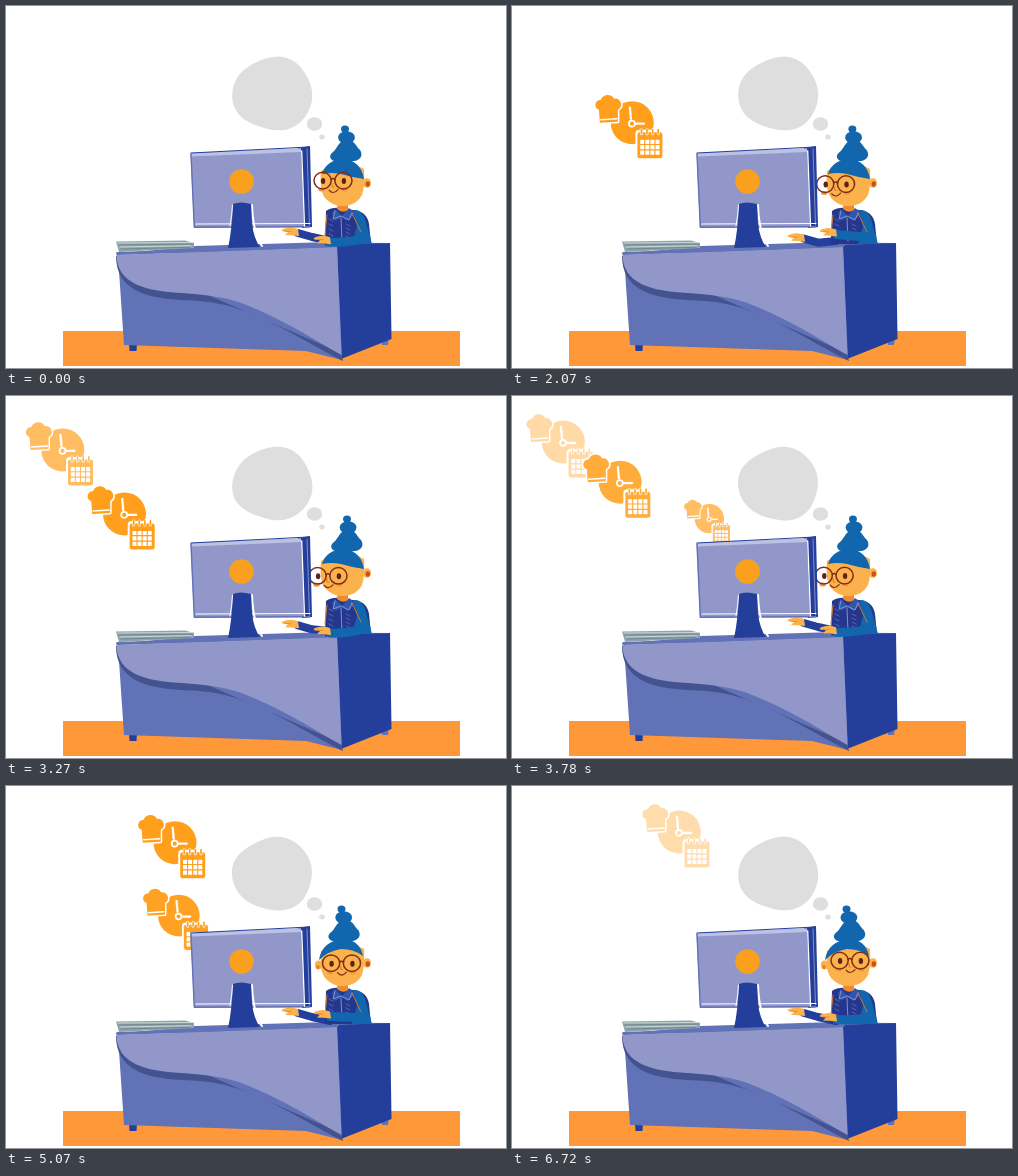
Animation of 500 by 362 pixels, one loop 6.75 s. Source, as an HTML page with a canvas:

```html
<!DOCTYPE html>
<html lang="en">
<head>
<meta charset="utf-8">
<title>Planning at the desk</title>
<style>
html, body { margin: 0; width: 100%; height: 100%; overflow: hidden; background: #fff; }
canvas { display: block; width: 500px; height: 362px; }
</style>
</head>
<body>
<canvas id="stage" width="500" height="362"></canvas>
<script>
const g = document.getElementById('stage').getContext('2d');
const LOOP = 6750, STEP = 30, TAU = Math.PI * 2;
const NAVY = '#233f9b', MID = '#6172b6', PALE = '#9297c9', BLUE = '#1166ad',
  SKIN = '#fcb24c', BROWN = '#7d2d18', ORANGE = '#ff9838', VEST = '#24378c';

g.lineCap = g.lineJoin = 'round';

function shape(d, color) {
  g.fillStyle = color;
  g.fill(new Path2D(d));
}
function line(d, color, width) {
  g.strokeStyle = color;
  g.lineWidth = width;
  g.stroke(new Path2D(d));
}
function oval(x, y, rx, ry, color, stroke) {
  g.beginPath();
  g.ellipse(x, y, rx, ry, 0, 0, TAU);
  if (stroke) {
    g.strokeStyle = color;
    g.lineWidth = stroke;
    g.stroke();
  } else {
    g.fillStyle = color;
    g.fill();
  }
}
function box(x, y, w, h, r, color) {
  g.beginPath();
  g.roundRect(x, y, w, h, r);
  g.fillStyle = color;
  g.fill();
}
const clamp = (v, lo = 0, hi = 1) => Math.max(lo, Math.min(hi, v));
const smooth = u => u * u * (3 - 2 * u);

// Each icon leaves the screen on a quadratic curve, grows, then fades
const SOURCE = [235, 175], FIRST = 1090, EVERY = 1020, FLIGHT = 2700, GROW = 950;
const flights = [
  { bend: [107, 139], end: [48, 50], life: 3350 },
  { bend: [86, 160], end: [107, 57], life: 2950 },
  { bend: [170, 105], end: [164, 50], life: 4400 },
  { bend: [163, 119], end: [122, 123], life: 2500 }
];

function icon({ bend, end, life }, age) {
  if (age <= 0 || age >= life) return;
  const e = Math.sin(clamp(age / FLIGHT) * TAU / 4);
  const [x, y] = SOURCE.map((s, i) =>
    (1 - e) ** 2 * s + 2 * e * (1 - e) * bend[i] + e * e * end[i]);
  const size = clamp(age / GROW);
  const fade = Math.min(size, clamp(2 - 2 * age / life));
  const color = `rgb(${[255, 159, 28].map(c => Math.round(255 + (c - 255) * fade))})`;
  const hat = 'M-29-4L-30-17C-35-18-35-27-28-27C-26-33-17-33-15-28C-8-29-5-20-11-17L-11-5Z';
  g.save();
  g.translate(x, y);
  g.scale(size, size);
  oval(3.3, -4, 21.5, 21.5, color);
  line('M1-19L2-8M7-3H15', '#fff', 2.3);
  oval(3, -3, 3, 3, '#fff', 1.8);
  line(hat, '#fff', 3);
  shape(hat, color);
  line('M-28-7L-12-8', '#fff', 1.5);
  box(6.5, 3, 28.5, 30, 4, '#fff');
  box(8.5, 5.5, 25, 26, 2.5, color);
  for (let i = 0; i < 4; i++) {
    const ring = `M${12.5 + i * 5.6} 3V7`;
    line(ring, '#fff', 3);
    line(ring, color, 1.7);
  }
  for (let i = 0; i < 12; i++)
    box(11.3 + i % 4 * 5.1, 13 + Math.floor(i / 4) * 5.4, 4, 4.2, .3, '#fff');
  g.restore();
}

function bubble(t) {
  const rock = .12 * Math.sin(TAU * 5 * t / LOOP);
  g.beginPath();
  for (let i = 0; i < 60; i++) {
    const a = i / 60 * TAU;
    const r = 1 + .035 * Math.cos(3 * (a - .9 + rock)) + .012 * Math.cos(5 * a - rock * 8);
    g.lineTo(267 + 40 * r * Math.cos(a), 88 + 36.5 * r * Math.sin(a));
  }
  g.fillStyle = '#dedede';
  g.fill();
  oval(308.5, 118, 7.7, 6.8, '#dedede');
  oval(316, 131, 2.8, 2.5, '#dedede');
}

function head(t) {
  const sway = Math.cos(TAU * t / LOOP);
  const turn = smooth(clamp((t - 3900) / 800));
  const fx = 324.5 + 2.5 * sway + 11 * turn, fy = 177.2 - 2.6 * sway;
  const lean = 1 - sway - 4.5 * turn;
  const front = turn > .6;

  shape('M332 192H342V204Q337 208 331 203Z', '#f08a2c');
  oval(361, 177, 4, 4.8, SKIN);
  oval(361.8, 178, 2.2, 2.8, '#c8521d');
  if (front) {
    oval(312.5, 179, 3.6, 4.5, SKIN);
    oval(312, 181, 1.5, 2, '#e8772a');
  }
  shape('M315 165Q313 186 320 193Q328 201 338 200Q351 199 356 189Q359 180 358 163Q337 151 315 165Z', SKIN);

  oval(339 + lean, 123, 4, 3.6, BLUE);
  oval(340.5 + lean * .8, 131.5, 8.4, 6.2, BLUE);
  g.save();
  g.translate(lean * .5, 0);
  shape('M340 134C349 133 350 141 354 144C359 152 350 156 345 155L347 159H331L334 155C325 157 321 150 327 146C332 142 332 135 340 134Z', BLUE);
  g.restore();
  shape(front
    ? 'M313 174Q316 155 337 153Q354 154 357 170Q348 163 335 163Q322 165 313 174Z'
    : 'M316 168Q320 154 338 153Q355 155 358 173Q345 171 335 168Q325 166 316 168Z', BLUE);

  for (const side of [-1, 1]) {
    const x = fx + side * 10.4;
    oval(x + side, fy + 9, 3.2, 2, '#f59a3a');
    oval(x + .5, fy + .5, 2.2, 3, '#5c2416');
    oval(x, fy, 8.6, 8.3, BROWN, 1.5);
  }
  line(`M${fx - 2} ${fy - 1}Q${fx} ${fy - 3} ${fx + 2} ${fy - 1}`, BROWN, 1.4);
  line(`M${fx - .8} ${fy + 3}Q${fx - 2} ${fy + 6.5} ${fx + 1} ${fy + 6.5}`, '#e8812d', 1.3);
  line(`M${fx - 4} ${fy + 9.5}Q${fx} ${fy + 14.5} ${fx + 5} ${fy + 9}`, BROWN, 1.2);
}

function hand(x, y) {
  shape(`M${x + 10} ${y - 3}Q${x + 3} ${y - 6} ${x - 5} ${y - 3}Q${x - 8} ${y - 1} ${x - 4} ${y - .5}`
    + `L${x} ${y}L${x - 3} ${y + 3}Q${x + 3} ${y + 3} ${x + 11} ${y + 4}Z`, SKIN);
  line(`M${x - 3} ${y - .8}L${x + 3} ${y - .5}`, '#e8812d', .8);
}

function woman(t) {
  const beat = t / 270;
  const swing = clamp(1.6 * Math.cos(TAU * (beat + .08)), -1, 1);
  const ly = 231.5 - 5.5 * swing, ry = 230.5 + 4.5 * Math.cos(TAU * (beat - .1));
  line(`M292 ${ly + 1}L306 ${ly + 5}L324 235`, NAVY, 8);
  hand(282, ly);
  shape('M320 205Q326 201 334 202L347 204Q361 205 363 218L365 238H319Z', VEST);
  shape('M347 204Q356 203 359 213L366 238H346L351 220Z', BLUE);
  shape('M329 203L336 210L343 202L350 208L341 215L336 211L329 215L326 207Z', '#2f55ad');
  line('M329 205L327 213L335 210L343 214L346 207M335 212L336 235', '#9aa6d6', .8);
  line('M346 207L355 226M321 209L319 228', '#c9773a', 1);
  for (let i = 0; i < 4; i++)
    line(`M323 ${213 + i * 5}l4 2M340 ${218 + i * 4}l4 2`, '#6a79bd', .7);
  line(`M360 232Q342 ${ry + 3} 324 ${ry + 2}`, BLUE, 9);
  line(`M321 ${ry - 2}L320 ${ry + 5}`, VEST, 1.5);
  hand(314, ry);
  head(t);
}

function monitor() {
  shape('M292 142L304 140L306 221L296 222Z', NAVY);
  line('M301 143L303.5 219', PALE, .9);
  shape('M184.5 147L295 142.5L298 221L188 221.5Z', PALE);
  shape('M184.5 147L295 142.5L295.2 146L185 150.5Z', '#bdc2e4');
  line('M185 147L303 141', NAVY, 1);
  line('M185 148L188.3 221.3L304 220.8', MID, 1.4);
  line('M295.7 145L298.5 220', '#fff', 1.3);
  line('M190 218L304 217.5', '#fff', 1.2);
  oval(235.5, 175.5, 12.3, 12.3, '#f9a01e');
  line('M246 199Q247 227 256 240', '#fff', 2);
  shape('M227 198Q234 195 245 198L246 218Q248 233 254 241L222 242Q226 224 227 198Z', NAVY);
  line('M226.5 199Q226 209 224 220', '#fff', 1);
}

function desk() {
  shape('M123 337H131L130.5 345H123.5Z', NAVY);
  shape('M375 331H383L382 339H376Z', MID);
  shape('M110 248L189 240L307 236.5L384 237L331 244Z', MID);
  shape('M330.5 239L384 237L385.5 333L335 353Z', NAVY);
  shape('M112 250L331 240L336 354L300 345L118 339Z', MID);
  shape('M110 250C110 284 140 292 175 294C205 295 224 298 250 310C286 325 312 343 337 355L335 347L112 250Z', '#435390');
  shape('M110.5 249L331 241L335.5 349C312 336 285 318 250 303C222 290 200 289 175 287C140 285 111 278 110.5 249Z', PALE);
  line('M111.5 247.5L331 239.5', MID, 3);
}

function papers() {
  shape('M110 235.5L179 234.5L188 237L188 242L113 246Z', '#8fa5aa');
  for (let i = 0; i < 4; i++)
    line(`M${112 + i} ${237 + i * 2}L${187 - i} ${236.5 + i * 1.6}`, i % 2 ? '#6f898f' : '#cbd7d9', 1);
}

function draw(now) {
  const t = Math.floor(now % LOOP / STEP) * STEP;
  g.fillStyle = '#fff';
  g.fillRect(0, 0, 500, 362);
  g.fillStyle = ORANGE;
  g.fillRect(57, 325, 397, 35);
  bubble(t);
  flights.forEach((f, i) => icon(f, t - FIRST - i * EVERY));
  desk();
  papers();
  woman(t);
  monitor();
}

const start = performance.now();
function tick() {
  draw(performance.now() - start);
  requestAnimationFrame(tick);
}
tick();
</script>
</body>
</html>
```
